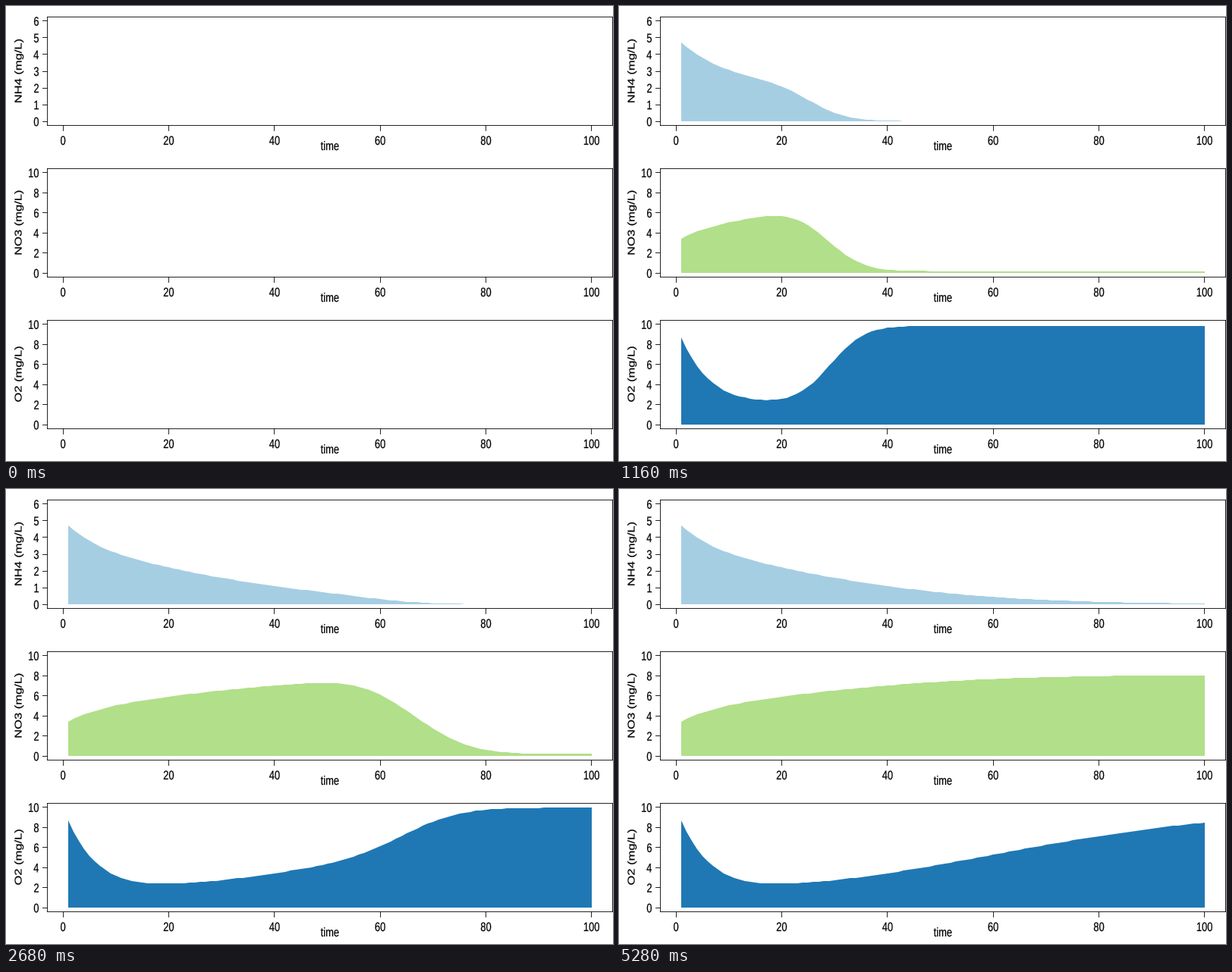
A matplotlib script for the animation above (6.04 s loop, 800 by 600 pixels).

```python
import numpy as np
import matplotlib.pyplot as plt
from matplotlib.animation import FuncAnimation
from matplotlib.patches import PathPatch, Polygon
from matplotlib.textpath import TextPath
from matplotlib.transforms import Affine2D

WIDTH, HEIGHT, DPI = 800, 600, 100
FRAMES, INTERVAL = 151, 40
LAST_STEP = 132
CELLS = 100

# River model: upwind transport, nitrification and reaeration
INFLOW = np.array([5.0, 3.1, 10.0])      # NH4, NO3, O2 in mg/L
START = np.array([0.1, 0.1, 10.0])
K_NITRI, K_HALF, O2_PER_N = 0.1, 5.0, 4.57
K_AIR, O2_SAT = 0.0426, 10.0

# Panel layout in pixels, y pointing down
LEFT, RIGHT, TOP, BOTTOM, PITCH = 54, 799, 14, 157, 200
PANELS = [
    ("NH4 (mg/L)", 6, 1, "#a6cee3"),
    ("NO3 (mg/L)", 10, 2, "#b2df8a"),
    ("O2 (mg/L)", 10, 2, "#1f78b4"),
]
EM, ASPECT = 12.9, 1.28                  # one font size and page aspect for all text
LINE_WIDTH = 0.85 * 72 / DPI


def rates(state):
    upstream = np.column_stack([INFLOW, state[:, :-1]])
    nh4, _, o2 = state
    nitri = K_NITRI * nh4 * o2 / (o2 + K_HALF)
    reaction = np.array([-nitri, nitri, K_AIR * (O2_SAT - o2) - O2_PER_N * nitri])
    return upstream - state + reaction


def simulate(steps, substeps=10):
    state = np.repeat(START[:, None], CELLS, axis=1)
    history = [state]
    h = 1 / substeps
    for _ in range(steps):
        for _ in range(substeps):
            a = rates(state)
            b = rates(state + h / 2 * a)
            c = rates(state + h / 2 * b)
            d = rates(state + h * c)
            state = state + h / 6 * (a + 2 * b + 2 * c + d)
        history.append(state)
    return history


def x_pixel(x):
    pad = 0.04 * (CELLS - 1)
    return LEFT + 0.5 + (x - 1 + pad) * (RIGHT - LEFT) / (CELLS - 1 + 2 * pad)


def unit_height(y_max):
    return (BOTTOM - TOP) / (1.08 * y_max)


def y_pixel(y, y_max, offset):
    return offset + BOTTOM - (y + 0.04 * y_max) * unit_height(y_max)


fig = plt.figure(figsize=(WIDTH / DPI, HEIGHT / DPI), dpi=DPI, facecolor="white")
ax = fig.add_axes([0, 0, 1, 1])
ax.set_xlim(0, WIDTH)
ax.set_ylim(HEIGHT, 0)
ax.axis("off")


def line(x0, y0, x1, y1):
    """Straight line through whole pixels; snapping moves it to pixel centres."""
    ax.plot([x0, x1], [y0, y1], color="black", lw=LINE_WIDTH, snap=True,
            solid_capstyle="projecting")


def label(text, x, y, anchor=0.5, angle=0):
    """Put text with its baseline at (x, y); anchor 0.5 centres, 1 aligns right."""
    path = TextPath((0, 0), text, size=EM, prop={"family": "Liberation Sans"})
    box = path.get_extents()
    shift = -(box.x0 + anchor * box.width)
    place = (Affine2D().translate(shift, 0).rotate_deg(angle)
             .scale(1, -ASPECT).translate(x, y))
    ax.add_patch(PathPatch(path, facecolor="black", edgecolor="black", lw=0.15,
                           transform=place + ax.transData))


def draw_panel(title, y_max, step, offset):
    top, bottom = TOP + offset, BOTTOM + offset
    line(LEFT, top, RIGHT, top)
    line(LEFT, bottom, RIGHT, bottom)
    line(LEFT, top, LEFT, bottom)
    line(RIGHT, top, RIGHT, bottom)
    for value in range(0, y_max + 1, step):
        y = y_pixel(value, y_max, offset)
        line(LEFT - 6, round(y), LEFT, round(y))
        label(str(value), 43, y + 6.6, anchor=1)
    for value in range(0, 101, 20):
        x = x_pixel(value)
        line(int(x), bottom, int(x), bottom + 7)
        label(str(value), x, bottom + 26)
    label("time", (LEFT + RIGHT) / 2 + 0.2, bottom + 33)
    label(title, 20.5, (top + bottom) / 2, angle=90)


areas = []
for row, (title, y_max, step, color) in enumerate(PANELS):
    draw_panel(title, y_max, step, row * PITCH)
    area = Polygon([(0, 0), (1, 0), (1, 1)], facecolor=color, lw=0,
                   snap=False, visible=False)
    areas.append(ax.add_patch(area))

history = simulate(LAST_STEP - 1)
xs = np.rint(x_pixel(np.arange(1, CELLS + 1)))


def update(frame):
    for row, area in enumerate(areas):
        area.set_visible(frame > 0)
        if frame == 0:
            continue
        y_max = PANELS[row][1]
        values = history[min(frame, LAST_STEP) - 1][row]
        base = round(y_pixel(0, y_max, row * PITCH))
        ys = base - np.rint(values * unit_height(y_max))
        outline = np.column_stack([xs, ys])
        area.set_xy(np.vstack([(xs[0], base), outline, (xs[-1], base)]))
    return areas


anim = FuncAnimation(fig, update, frames=FRAMES, interval=INTERVAL,
                     repeat=True, repeat_delay=0, blit=False)
plt.show()
```
